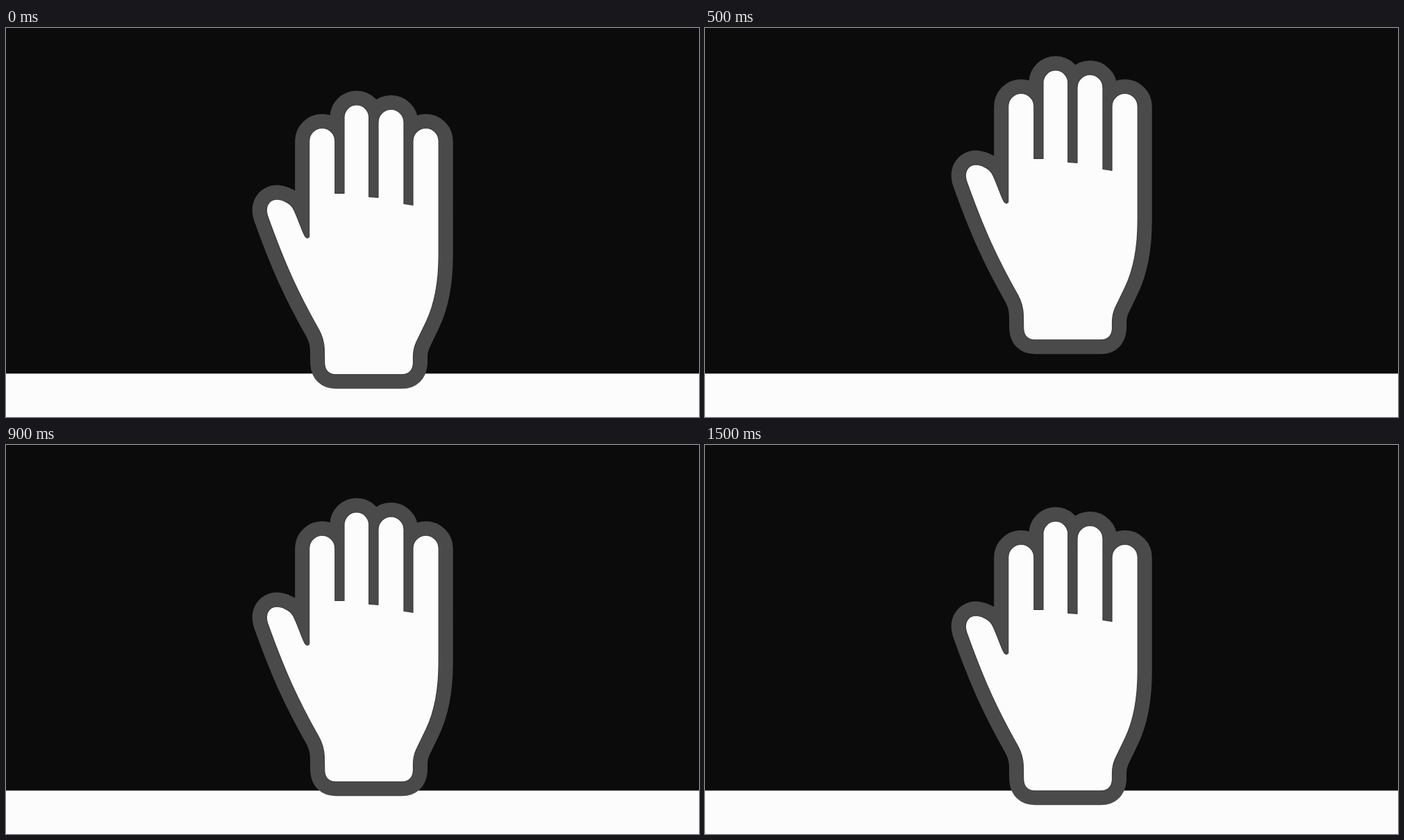
An HTML page with a canvas that plays this animation: 998 by 561 pixels, repeating every 1600 ms.

```html
<!DOCTYPE html>
<html lang="en">
<head>
<meta charset="utf-8">
<title>Bouncing hand</title>
<style>
  html, body { margin: 0; width: 100%; height: 100%; overflow: hidden; background: #0b0b0b; }
  canvas { display: block; }
</style>
</head>
<body>
<canvas id="stage" width="998" height="561"></canvas>
<script>
const ctx = document.getElementById('stage').getContext('2d');
const STEP = 100;
const BOUNCE = 400;
const HEIGHT = 52.5;
const FLOOR = 498.4;

// Moments of the bounce, in ms, held for one step each.
const moments = [0, 81, 162, 260, 384, 456, 575, 694, 806, 942, 1043, 1144, 1256, 1352, 1456, 1560];

// Cubic ease-in-out with control points (.42, 0) and (.58, 1).
function easeInOut(x) {
  let low = 0, high = 1;
  for (let i = 0; i < 24; i++) {
    const s = (low + high) / 2, r = 1 - s;
    if (3 * r * r * s * 0.42 + 3 * r * s * s * 0.58 + s ** 3 < x) low = s;
    else high = s;
  }
  return low * low * (3 - 2 * low);
}

function lift(moment) {
  const phase = moment / BOUNCE % 2;
  return Math.round(HEIGHT * easeInOut(phase < 1 ? phase : 2 - phase));
}

function addFinger(path, left, right, top, base) {
  const radius = (right - left) / 2;
  path.lineTo(left, base);
  path.arc(left + radius, top + radius, radius, Math.PI, 0);
}

function makeHand() {
  const hand = new Path2D();
  hand.moveTo(434, 303);
  hand.lineTo(436.7, 301);
  addFinger(hand, 436.7, 473.8, 144.5, 301);
  hand.lineTo(473.8, 238.4);
  addFinger(hand, 487, 522.7, 111, 238.4);
  hand.lineTo(522.7, 243.3);
  addFinger(hand, 536, 573, 117.5, 244.3);
  hand.lineTo(573, 253.3);
  addFinger(hand, 586, 623.2, 144.5, 255.3);
  hand.lineTo(623.2, 328);
  hand.bezierCurveTo(623.2, 370, 616, 401, 605, 424);
  hand.lineTo(591, 453);
  hand.quadraticCurveTo(586.5, 463, 586.5, 474);
  hand.lineTo(586.5, 484);
  hand.quadraticCurveTo(585, 499.8, 570, 499.8);
  hand.lineTo(475, 499.8);
  hand.quadraticCurveTo(460, 499.8, 458.7, 484);
  hand.lineTo(458.4, 464);
  hand.quadraticCurveTo(458, 449, 451, 436);
  hand.bezierCurveTo(421, 383, 402, 342, 376.7, 271);
  hand.bezierCurveTo(372.5, 258, 378, 247, 391, 247);
  hand.bezierCurveTo(400, 248, 411, 253, 415, 263);
  hand.bezierCurveTo(422, 278, 427, 295, 431, 301);
  hand.closePath();
  return hand;
}

const hand = makeHand();

function outline(color, width) {
  ctx.strokeStyle = color;
  ctx.lineWidth = width;
  ctx.stroke(hand);
}

function draw(time) {
  const index = Math.floor(time / STEP) % moments.length;
  ctx.fillStyle = '#0b0b0b';
  ctx.fillRect(0, 0, 998, 561);
  ctx.fillStyle = '#fcfcfc';
  ctx.fillRect(0, FLOOR, 998, 561 - FLOOR);

  ctx.save();
  ctx.translate(0, -lift(moments[index]));
  ctx.lineJoin = 'round';
  outline('#4a4a4a', 41);
  ctx.fill(hand);
  outline('#3a3a3a', 1.2);
  ctx.restore();
}

let start;
function tick(now) {
  start ??= now;
  draw(Math.max(0, now - start));
  requestAnimationFrame(tick);
}
draw(0);
requestAnimationFrame(tick);
</script>
</body>
</html>
```
